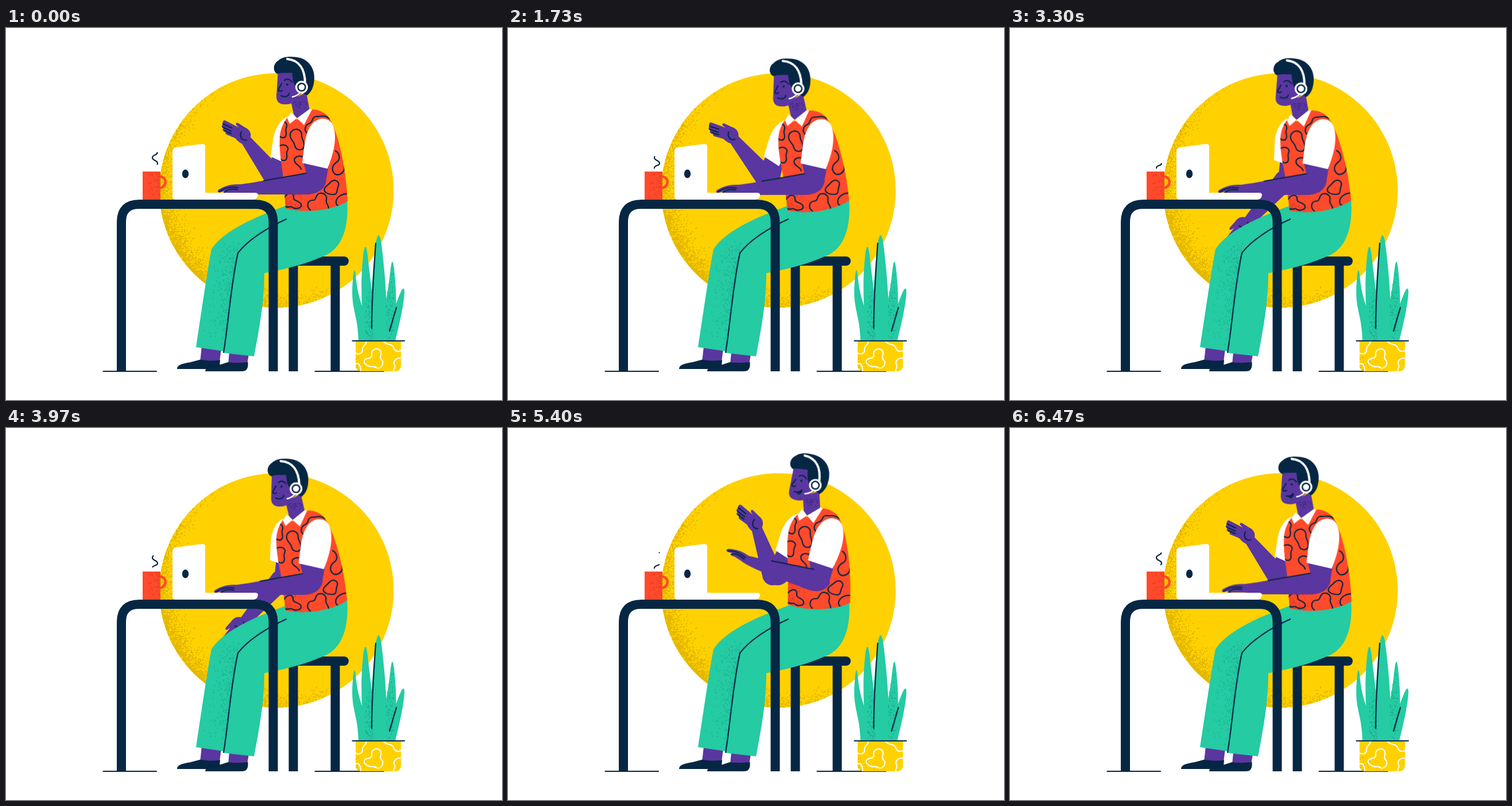
An HTML page that plays this animation: 864x648 px, repeating every 6510 ms.

```html
<!DOCTYPE html>
<html lang="en">
<head>
<meta charset="utf-8">
<title>Desk call</title>
<style>
  html, body { margin: 0; width: 100%; height: 100%; overflow: hidden; background: #fff; }
  svg { display: block; width: 100vw; height: 100vh; }
  .navy { fill: #062744; }
  .skin { fill: #5a36a0; }
  .red { fill: #ff4a2b; }
  .green { fill: #24cba3; }
  .yellow { fill: #ffd100; }
  .white { fill: #fff; }
  .ink { fill: none; stroke: #062744; stroke-width: 2.2; stroke-linecap: round; stroke-linejoin: round; }
  .chalk { fill: none; stroke: #fff; stroke-width: 2; stroke-linecap: round; }
  .bar { fill: none; stroke: #062744; stroke-width: 16; }
  .fingers { fill: none; stroke: #5a36a0; stroke-width: 7; stroke-linecap: round; }
  #band { stroke-width: 4; }
  #mic { stroke-width: 2.5; }

  #steam { stroke-dasharray: 72 73; animation: rise 2170ms linear infinite; }
  @keyframes rise { from { stroke-dashoffset: -29; } to { stroke-dashoffset: -174; } }

  #shoe { transform-origin: 365px 591px; animation: tap 6510ms ease-in-out infinite; }
  @keyframes tap {
    0%, 11%, 18.5%, 42%, 49.5%, 100% { transform: none; }
    14%, 15%, 45%, 46% { transform: rotate(12deg); }
  }

  #smile { animation: hide 6510ms step-end infinite; }
  #talk { animation: show 6510ms step-end infinite; }
  #eye { animation: shut 6510ms step-end infinite; }
  #lid { animation: blink 6510ms step-end infinite; }
  @keyframes hide { 0% { opacity: 1; } 74% { opacity: 0; } 99.7% { opacity: 1; } }
  @keyframes show { 0% { opacity: 0; } 74% { opacity: 1; } 99.7% { opacity: 0; } }
  @keyframes shut { 0% { opacity: 1; } 35% { opacity: 0; } 37.8% { opacity: 1; } }
  @keyframes blink { 0% { opacity: 0; } 35% { opacity: 1; } 37.8% { opacity: 0; } }
</style>
</head>
<body>
<svg viewBox="0 0 864 648">
  <defs>
    <path id="vestShape" d="M497 150C488 156 479 170 477 188C475 215 481 240 483 262L487 314C520 323 565 319 595 302C593 255 583 195 566 162C560 148 545 141 531 142L507 160Z"/>
    <path id="pantsShape" d="M500 305C445 325 382 349 358 385C352 415 341 490 331 556L379 563L379 566L432 572C442 520 450 475 450 427C480 421 515 414 552 398C587 385 598 345 594 296Z"/>
    <path id="potShape" d="M609 546H688V587Q688 598 677 598H620Q609 598 609 587Z"/>
    <clipPath id="vestClip"><use href="#vestShape"/></clipPath>
    <clipPath id="pantsClip"><use href="#pantsShape"/></clipPath>
    <clipPath id="potClip"><use href="#potShape"/></clipPath>
    <clipPath id="sunClip"><circle cx="471.2" cy="283" r="204.2"/></clipPath>
    <clipPath id="leafClip"><path id="leafShape"/></clipPath>
  </defs>

  <circle class="yellow" cx="471.2" cy="283" r="204.2"/>
  <g clip-path="url(#sunClip)"><path id="sunGrain" fill="#deb300"/></g>

  <!-- stool and floor -->
  <path class="bar" stroke-linecap="round" d="M508 406H589"/>
  <path class="bar" d="M500.5 406V598M573.5 406V598"/>
  <path class="ink" d="M169.5 598H262M538.5 598H658"/>

  <!-- plant -->
  <path class="green" id="leaves"/>
  <g clip-path="url(#leafClip)"><path id="leafGrain" fill="#1bab90"/></g>
  <path class="ink" d="M644 375C641 420 637 470 637 523M680 487L668 528"/>
  <use href="#potShape" class="yellow"/>
  <g clip-path="url(#potClip)">
    <path id="potGrain" fill="#e0b500"/>
    <path class="chalk" d="M608 566C616 570 622 566 621 559C621 553 627 553 628 546M637 590C627 589 620 582 626 577C632 574 638 576 637 569C636 561 646 555 652 562C657 568 648 573 655 579C660 587 650 596 644 591Q640 589 637 590M658 546C662 553 672 549 675 556C677 564 684 565 689 561M690 575C680 574 673 580 677 587C679 592 674 594 675 600M609 585C616 583 619 590 617 600"/>
  </g>
  <path class="ink" d="M603.5 545H694"/>

  <!-- far arm -->
  <path class="skin" id="farUpper"/>
  <path class="skin" id="farFore"/>
  <g id="farHand">
    <path class="skin" d="M9 -3C11 -12 6 -18 -1 -21L-12 -28C-16 -30 -18 -27 -15 -24L-8 -17L-15 -21L-25 -10L-14 2C-9 7 -3 9 0 9Z"/>
    <path class="fingers" d="M-12 -17L-36 -29.5M-13 -13L-37.500 -23M-13 -9L-36 -17M-11 -3L-31 -11.5"/>
    <path class="ink" d="M-39 -27L-24 -20M-39 -21L-25 -14.5M-36 -15L-25 -10M-7 -13C-11 -5 -6 3 2 1"/>
  </g>
  <path class="white" id="farSleeve" d="M492 154C479 158 470 172 466 190L461 224L490 237L500 200Z"/>

  <!-- legs -->
  <path class="skin" d="M341 554L375 558L372 582H338ZM389 564L423 568L420 586H387Z"/>
  <path class="navy" id="shoe" d="M298 594C298 585 313 584 324 581.5L339 577.5C350 580 362 580 373 578.5L372 590L361 594Z"/>
  <path class="navy" d="M347 598C348 589 360 588 371 587L387 582C398 584 410 583 421.5 582V588Q421 598 411 598Z"/>
  <use href="#pantsShape" class="green"/>
  <g clip-path="url(#pantsClip)"><path id="pantsGrain" fill="#1cb394"/></g>
  <path class="ink" d="M379 565C387 520 391 450 404 392C420 370 455 348 488 333"/>

  <g id="torso">
    <use href="#vestShape" class="red"/>
    <g clip-path="url(#vestClip)">
      <path id="vestGrain" fill="#d83a24"/>
      <path class="ink" d="M480 164C487 161 491 168 488 174C486 179 490 184 487 189C484 193 480 191 477 189
        M500 178C507 174 515 178 515 186C514 193 521 198 519 207C516 215 505 213 503 205C502 197 494 194 495 186C495 182 497 180 500 178Z
        M477 205C486 201 494 207 490 214C487 220 492 226 487 230C483 232 479 230 478 228
        M518 225C509 220 500 226 503 233C506 240 512 238 514 246
        M524 183C518 177 522 168 529 166C536 163 532 155 540 154C549 155 554 150 564 158"/>
      <path class="ink" d="M574 214C581 218 583 228 577 233C569 238 566 246 571 252C576 259 586 255 589 247C590 242 588 238 592 235
        M566 268C574 262 581 268 579 275C575 282 579 290 570 290C561 290 552 286 555 279C558 274 562 273 566 268Z
        M486 294C493 284 502 288 501 295C500 302 511 300 514 307C516 314 505 316 500 313C495 309 491 314 487 311
        M530 317C522 310 526 300 534 300C542 300 538 291 546 288C554 286 560 293 558 299C556 306 563 308 562 316
        M596 289C586 288 576 294 575 302C574 308 579 312 583 309"/>
    </g>
    <g id="head">
      <path class="skin" d="M496 126L501 150L507 158L529 143L523 112Z"/>
      <path id="neckGrain" fill="#42267f"/>
      <path class="skin" d="M474 72L471 119Q471 133 486 133C497 134 505 128 509 119L521 108L515 70Z"/>
      <path class="navy" d="M473 80C464 76 465 62 474 57C481 50 493 49 504 50.5C523 52 537 66 537 86C537 102 532 112 524 117.5C519 114 511 110 505 101C499 97 500 88 498 78C489 79 481 77 473 80Z"/>
      <path class="ink" d="M480 97C478 103 473 106 475 109Q478 111 481 109M485 91Q492 86 498 94"/>
      <circle class="navy" id="eye" cx="490" cy="98.5" r="2"/>
      <path class="ink" id="lid" d="M486 99Q490 101.5 494 98"/>
      <path class="ink" id="smile" d="M479 118C485 121 492 120 493 114"/>
      <path class="navy" id="talk" d="M479 117.500Q489 119 492 113L494 114Q494 122 487 123Q487 120 479 119.500Z"/>
      <path class="chalk" id="band" d="M490 54C511 56 521 72 521 97"/>
      <path class="chalk" id="mic" d="M513 112Q508 118 499 120"/>
      <circle class="white" cx="515" cy="103" r="11"/>
      <circle class="navy" cx="515" cy="103" r="7.8"/>
      <circle class="white" cx="515" cy="103" r="5.3"/>
    </g>
    <path class="white" d="M497 147L507 157L494 167L490 157ZM507 157L529 141L533 142L519 169Z"/>
    <g id="arm">
      <path class="skin" d="M517 230L562 240L557 268Q550 285 530 285L523 253Z"/>
      <path class="white" d="M551 158C534 159 524 176 520 203L516 235L560 245C568 225 574 205 573 186C572 166 564 158 551 158Z"/>
      <g id="fore">
        <path class="skin" d="M523 253L448 266C428 270 416 271 402 273.5V286C420 290 440 290 455 290L525 290C545 289 556 280 558 265L541 250Z"/>
        <path class="ink" d="M449 266L523 253"/>
        <g id="hand">
          <path class="skin" d="M408 272.5C392 271 380 276 371 281C367 284 369 288 374 286L381 284C377 288 381 290 386 287L408 287Z"/>
          <path class="ink" d="M372 285C382 277 392 276 404 278M380 286.5C387 280 394 280 403 281.5"/>
        </g>
      </g>
    </g>
  </g>

  <!-- desk -->
  <path class="white" d="M296 208L341 202Q347 201.5 347 207V287H434Q439 287 439 291Q438 299 430 299H296Q290 299 290 293V214Q290 209 296 208Z"/>
  <ellipse class="navy" cx="312.5" cy="254" rx="5.7" ry="7.6"/>
  <circle cx="268" cy="268.5" r="9.8" fill="none" stroke="#ff4a2b" stroke-width="4.5"/>
  <path class="red" d="M238 250H269V299H238Z"/>
  <path id="mugGrain" fill="#e03d22"/>
  <path class="ink" id="steam" pathLength="100" d="M255 244C255 238 264 241 264 235.5C264 230.5 255 231 255 226C255 220.5 263.5 222 263.5 217"/>
  <path class="bar" d="M201 598V338Q201 307 232 307H434Q465.5 307 465.5 338V598"/>
</svg>
<script>
const LOOP = 6510;
const el = id => document.getElementById(id);
const clamp = v => Math.max(0, Math.min(1, v));

// Static texture
let seed = 11;
const rnd = () => (seed = seed * 16807 % 2147483647) / 2147483647;

function grain(id, x0, y0, x1, y1, chance) {
  let d = '';
  for (let y = y0; y < y1; y += 2)
    for (let x = x0; x < x1; x += 2)
      if (rnd() < chance(x, y)) d += `M${x} ${y}h1.8v1.8h-1.8z`;
  el(id).setAttribute('d', d);
}

grain('sunGrain', 266, 100, 560, 488, (x, y) =>
  .9 * clamp((Math.hypot(x - 495, y - 262) - 184) / 48) ** 1.8);
grain('pantsGrain', 332, 368, 408, 562, (x, y) => {
  const left = 358 - (y - 384) * .157, seam = 403 - (y - 393) * .14;
  const u = (x - left) / (seam - left);
  return u > 1 ? 0 : .6 * clamp(u) ** 2 * clamp((565 - y) / 130) * clamp((y - 365) / 30);
});
grain('vestGrain', 476, 262, 530, 320, (x, y) => .4 * clamp((524 - x) / 40));
grain('neckGrain', 500, 128, 524, 142, (x, y) => .35 * clamp((142 - y) / 10));
grain('leafGrain', 626, 420, 690, 545, (x, y) =>
  x < 640 ? .3 * clamp((y - 450) / 60) : x > 660 && x < 676 ? .25 * clamp((y - 420) / 60) : 0);
grain('potGrain', 609, 560, 688, 598, (x, y) => .2 * clamp((640 - x) / 30) * clamp((y - 555) / 40));
grain('mugGrain', 246, 252, 268, 298, x => .3 * clamp((x - 246) / 22));

// tip x y, tip half-width, base centre, base half-width
function leaf(x, y, w, base, half) {
  const a = base - half, b = base + half;
  return `M${a} 545C${a - 2} 490 ${x - w - 3} ${y + 70} ${x - w * .5} ${y + 12}` +
    `Q${x} ${y - 12} ${x + w * .5} ${y + 12}C${x + w + 3} ${y + 70} ${b + 2} 490 ${b} 545Z`;
}
const leaves = leaf(607, 422, 5, 622, 8) + leaf(626, 381, 7, 632, 9) +
  leaf(649, 361, 9, 650, 13) + leaf(673, 407, 6, 667, 10) +
  'M662 545C668 515 680 475 689 457Q694 449 694 460C693 485 684 520 678 545Z';
el('leaves').setAttribute('d', leaves);
el('leafShape').setAttribute('d', leaves);

// Pose tracks: [ms, value, ...]
const lean = [[0, 0], [600, -2.8], [4900, -2.8], [5500, 5.2], [5950, 5.3], [6440, .3], [LOOP, 0]];
const nod = [[0, 0], [600, .8], [1000, .8], [1350, -2], [1650, -2], [1950, .8], [2750, .8],
  [3050, -2], [3350, .8], [3600, .8], [3950, -2], [4150, -2], [4450, .8], [4900, .8],
  [5450, 7.5], [5950, 7.5], [6440, .2], [LOOP, 0]];
const upper = [[0, 0], [4900, 0], [5500, 6], [5950, 6], [6440, 0], [LOOP, 0]];
const lower = [[0, 0], [4150, 0], [4250, 1.5], [4350, 0], [4450, 1.5], [4550, 0], [4880, 0],
  [5500, 21.6], [6000, 21.6], [6440, .3], [LOOP, 0]];
const wrist = [[0, 0], [4880, 0], [5500, 12], [6000, 12], [6440, 0], [LOOP, 0]];

// sleeve angle, elbow x y, wrist x y, hand angle
const open = [0, 465, 256, 417, 194, 0];
const reach = [9, 446, 257, 393, 193, -7];
const lap = [-6, 478, 266, 413, 340, -80];
const up = [9, 461, 256, 433, 174, 13];
const far = [[0, ...open], [600, ...reach], [1000, ...reach], [1350, 8, 448, 257, 396, 195, -2],
  [1700, ...reach], [1950, ...reach], [2330, ...lap], [4800, ...lap],
  [5100, -5, 476, 272, 397, 323, -50], [5400, ...up], [5700, 9, 461, 256, 431, 175, 9],
  [5950, ...up], [6440, ...open], [LOOP, ...open]];

const ease = u => u < .5 ? 4 * u ** 3 : 1 - 4 * (1 - u) ** 3;

function at(track, t) {
  let i = 1;
  while (i < track.length - 1 && track[i][0] < t) i++;
  const a = track[i - 1], b = track[i];
  const k = ease(clamp((t - a[0]) / (b[0] - a[0])));
  return a.slice(1).map((v, j) => v + (b[j + 1] - v) * k);
}

const hip = [565, 315], shoulder = [486, 168];
const turn = (id, angle, x, y) => el(id).setAttribute('transform', `rotate(${angle} ${x} ${y})`);

// Tapered capsule between two circles
function limb(x1, y1, r1, x2, y2, r2) {
  const d = Math.hypot(x2 - x1, y2 - y1), nx = (y1 - y2) / d, ny = (x2 - x1) / d;
  return `M${x1 + nx * r1} ${y1 + ny * r1}L${x2 + nx * r2} ${y2 + ny * r2}` +
    `A${r2} ${r2} 0 0 0 ${x2 - nx * r2} ${y2 - ny * r2}L${x1 - nx * r1} ${y1 - ny * r1}` +
    `A${r1} ${r1} 0 0 0 ${x1 + nx * r1} ${y1 + ny * r1}Z`;
}

function pose(t) {
  const [a] = at(lean, t), [h] = at(nod, t), [u] = at(upper, t), [f] = at(lower, t), [w] = at(wrist, t);
  turn('torso', a, ...hip);
  turn('head', h - a, 512, 138);
  turn('arm', u - a, 552, 185);
  turn('fore', f - u, 538, 270);
  turn('hand', w, 408, 280);

  const [s, ex, ey, wx, wy, p] = at(far, t);
  const r = a * Math.PI / 180, dx = shoulder[0] - hip[0], dy = shoulder[1] - hip[1];
  const sx = hip[0] + dx * Math.cos(r) - dy * Math.sin(r);
  const sy = hip[1] + dx * Math.sin(r) + dy * Math.cos(r);
  el('farUpper').setAttribute('d', limb(sx + 6, sy, 8, ex + 9, ey - 2, 20));
  el('farFore').setAttribute('d', limb(ex, ey, 18, wx, wy, 9));
  el('farHand').setAttribute('transform', `translate(${wx} ${wy}) rotate(${p})`);
  el('farSleeve').setAttribute('transform',
    `translate(${sx} ${sy}) rotate(${s}) translate(${-shoulder[0]} ${-shoulder[1]})`);
}

const start = performance.now();
function tick() {
  pose((performance.now() - start) % LOOP);
  requestAnimationFrame(tick);
}
tick();
</script>
</body>
</html>
```
